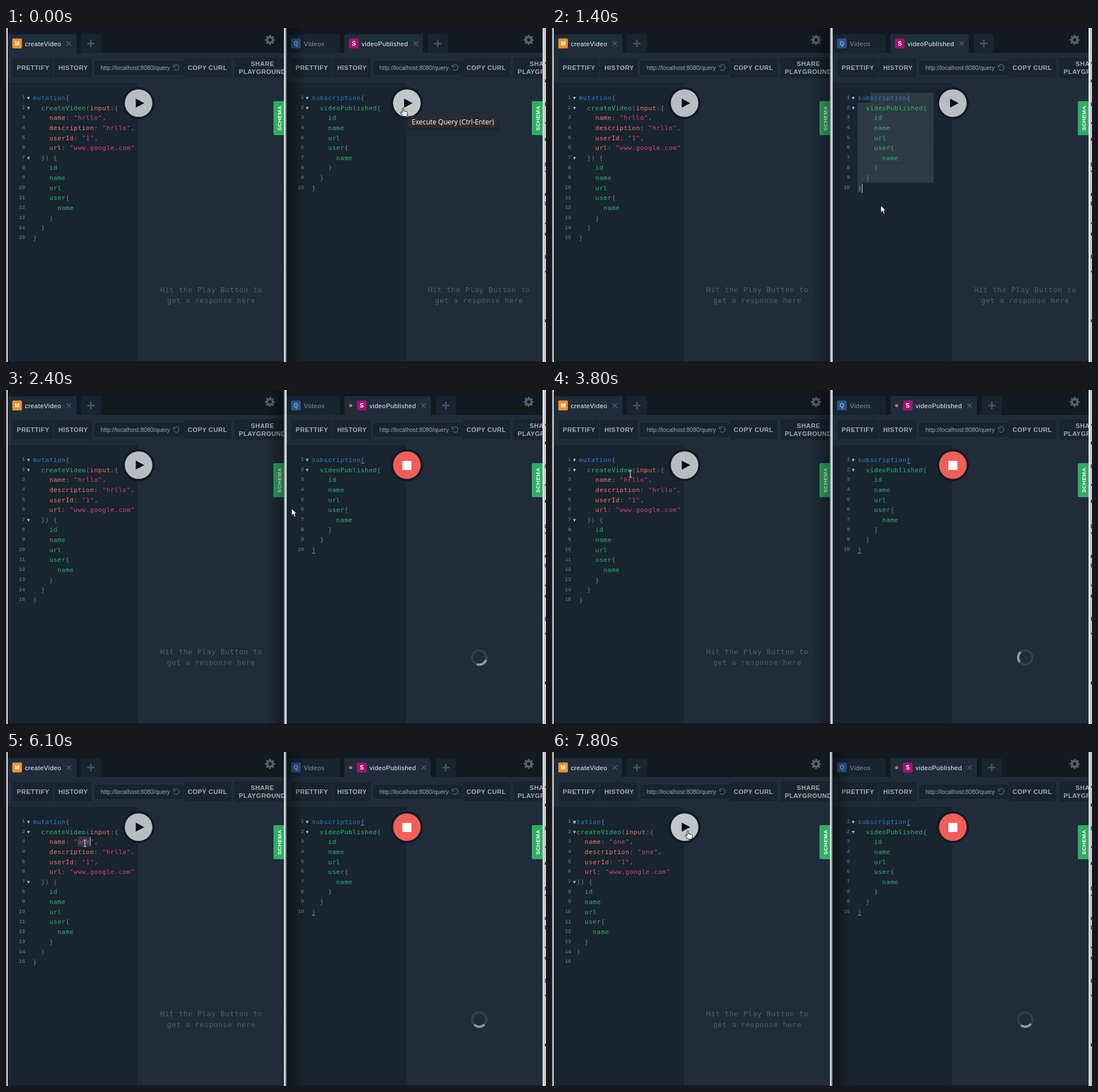
An HTML page that plays this animation: 951 by 589 pixels, repeating every 8 s.

```html
<!DOCTYPE html>
<html lang="en">
<head>
<meta charset="utf-8">
<title>Playground</title>
<style>
  html, body { margin: 0; width: 100%; height: 100%; overflow: hidden; background: #111a20; }
  svg { display: block; width: 951px; height: 589px; }
  text { white-space: pre; font: 11.2px "Liberation Sans", Arial, sans-serif; letter-spacing: .424px; }
  .code text { font: 11.2px "DejaVu Sans Mono", monospace; letter-spacing: .437px; fill: #77828a; }
  .k { fill: #2a7ed3; }
  .a { fill: #f77466; }
  .s { fill: #d64292; }
  .p { fill: #29b973; }
  text.num { font-size: 9.6px; font-weight: 700; letter-spacing: 0; fill: #5d6b75; text-anchor: end; }
  text.btn { font-weight: 700; fill: #a5abb1; }
  text.url { font-size: 10.4px; letter-spacing: 0; fill: #a0a7ad; }
  text.hint { font: 12.8px "DejaVu Sans Mono", monospace; letter-spacing: .48px; fill: #53606b; text-anchor: middle; }
  text.side { font-size: 9.6px; font-weight: 700; fill: #fff; text-anchor: middle; }
  text.badge { font-size: 10.4px; font-weight: 700; letter-spacing: 0; text-anchor: middle; }
  text.tip { font: 500 12px "Open Sans", "Noto Sans", sans-serif; letter-spacing: 0; fill: #fff; }
</style>
</head>
<body>
<svg id="stage" viewBox="0 0 951 589"></svg>
<script>
const LOOP = 8000, ROW = 17.64, CHAR = 7.18, CODE_X = 47.5, SHIFT = 491;
const BAR = '#121a20', PANEL = '#1f2d3b', EDITOR = '#18242e', CHIP = '#18242e';

const rect = (x, y, w, h, fill, more = '') =>
  `<rect x="${x}" y="${y}" width="${w}" height="${h}" fill="${fill}" ${more}/>`;
const circle = (x, y, r, fill, more = '') =>
  `<circle cx="${x}" cy="${y}" r="${r}" fill="${fill}" ${more}/>`;
const text = (x, y, str, cls = '', more = '') =>
  `<text x="${x}" y="${y}" class="${cls}" ${more}>${str}</text>`;
const path = (d, stroke, width, more = '') =>
  `<path d="${d}" fill="none" stroke="${stroke}" stroke-width="${width}" ${more}/>`;
const cross = x => path(`M${x - 4} 23.5l8 8m0-8l-8 8`, '#56636d', 1.3);
const plus = x => rect(x - 17.5, 11, 35, 33, CHIP, 'rx="2"') +
  path(`M${x - 6.5} 27.5h13m-6.5-6.5v13`, '#45525c', 3);
const badge = (x, letter, fill, ink) =>
  rect(x, 18.5, 17, 17.5, fill, 'rx="2"') + text(x + 8.5, 31, letter, 'badge', `fill="${ink}"`);
const gear = x => circle(x, 21, 4.9, 'none', 'stroke="#55626c" stroke-width="4"') +
  circle(x, 21, 7.5, 'none', 'stroke="#55626c" stroke-width="3" stroke-dasharray="2.95" stroke-dashoffset="1.47"');

const mutation = (name, desc) => [
  'mutation{', '  createVideo(input:{', `    name: "${name}",`, `    description: "${desc}",`,
  '    userId: "1",', '    url: "www.google.com"', '  }) {', '    id', '    name', '    url',
  '    user{', '      name', '    }', '  }', '}'];
const subscription = ['subscription{', '  videoPublished{', '    id', '    name', '    url',
  '    user{', '      name', '    }', '  }', '}'];

const paint = line => line.replace(/"[^"]*"|\w+(:?)/g, (word, colon) => {
  if (word[0] === '"') return `<tspan class="s">${word}</tspan>`;
  if (colon) return `<tspan class="a">${word.slice(0, -1)}</tspan>:`;
  return `<tspan class="${/^(mutation|subscription)$/.test(word) ? 'k' : 'p'}">${word}</tspan>`;
});
const code = lines => lines.map((l, i) => text(CODE_X, 127 + ROW * i, paint(l))).join('');
const gutter = (count, folds) =>
  Array.from({ length: count }, (_, i) => text(33.5, 125.2 + ROW * i, i + 1, 'num')).join('') +
  folds.map(i => `<path d="M37 ${121.6 + ROW * i}h5l-2.5 4.8z" fill="#b9bfc4"/>`).join('');

const toolbar = () => {
  const chip = (x, w, label, tx) => rect(x, 53, w, 34, CHIP, 'rx="2"') + text(tx, 74, label, 'btn');
  return chip(12, 71, 'PRETTIFY', 19) + chip(85, 66, 'HISTORY', 92.3) +
    rect(156.5, 59, 155, 22.5, CHIP, 'rx="3" stroke="#111b23"') +
    text(166.8, 74, 'http://localhost:8080/query', 'url') +
    path('M296 66.5a5 5 0 1 1-.3 6M295 65v3.8h3.8', '#6a757e', 1.1) +
    chip(313, 84, 'COPY CURL', 320) +
    rect(402, 52, 100, 36, CHIP, 'rx="2"') +
    text(431, 67, 'SHARE', 'btn') + text(410, 81, 'PLAYGROUND', 'btn');
};

function pane(id, x, end, split, gearX, dx, inner, tabs) {
  const hintX = (split + end) / 2 + (dx ? 8.5 : .5);
  return `<clipPath id="${id}Clip">${rect(x, 0, end - x, 589, '#000')}</clipPath>
  <g clip-path="url(#${id}Clip)">
    ${rect(x, 0, end - x, 44, BAR)}${rect(x, 44, end - x, 545, PANEL)}
    ${rect(x, 97, split - x, 492, EDITOR)}
    ${tabs}${gear(gearX)}
    <g transform="translate(${dx})">${toolbar()}${inner}</g>
    ${rect(end - 19, 129, 22, 60, '#30ad63', 'rx="2"')}
    ${text(0, 0, 'SCHEMA', 'side', `transform="translate(${end - 4.6} 159) rotate(-90)"`)}
    <g id="${id}Hint">${text(hintX, 466, 'Hit the Play Button to', 'hint')}${text(hintX, 485, 'get a response here', 'hint')}</g>
    ${rect(x, 588, end - x, 1, '#10181e')}
    ${rect(dx ? x : end - 32, 0, 32, 589, `url(#${id}Shade)`, `id="${id}Shadow"`)}
  </g>`;
}
const button = (id, x) => circle(x, 132.5, 28.3, '#111a21') +
  circle(x, 132.5, 24.3, '#b8bdc3', `id="${id}Disc"`) +
  `<path id="${id}Play" d="M${x - 5} 124.5v16l15-8z" fill="#0b0f13"/>`;
const shade = (id, from, to) => `<linearGradient id="${id}">
  <stop offset="0" stop-opacity="${from}"/><stop offset="1" stop-opacity="${to}"/></linearGradient>`;

const leftTabs = rect(3, 11, 121, 34, PANEL, 'rx="2"') + badge(11, 'M', '#f18f2b', '#fff') +
  text(33.2, 31.5, 'createVideo', '', 'fill="#f2f4f5"') + cross(110.5) + plus(149.5);
const rightTabs = rect(490, 11, 98, 33, CHIP, 'rx="2"') + badge(502, 'Q', '#265588', '#9aa9b8') +
  text(524.5, 31.5, 'Videos', '', 'fill="#8b959c"') +
  rect(596, 11, 138, 34, PANEL, 'id="tab" rx="2"') + circle(607, 27.5, 2.8, '#f25c54', 'id="dot"') +
  `<g id="tabBody">${badge(604, 'S', '#a6126f', '#fff')}${
    text(626.3, 31.5, 'videoPublished', '', 'fill="#f2f4f5"')}${cross(721.5)}${plus(760.5)}</g>`;

const bracket = (col, row) => rect(CODE_X + CHAR * col, 128.6 + ROW * row, 6.7, 1, '#8b959c');
const selRow = (from, to, row) =>
  rect(from, 114 + ROW * row, to - from, ROW + .1, '#2f3b44');
const allRows = selRow(CODE_X + CHAR * 3, 181, 0) +
  Array.from({ length: 8 }, (_, i) => selRow(47, 181, i + 1)).join('') + selRow(47, 55, 9);

// slivers of the page behind the right window
const behind = rect(945, 0, 6, 589, '#c7c9ce') +
  [60, 91, 131, 166, 194, 237, 251, 291, 306, 343, 361, 400, 428, 514].map((y, i) =>
    rect(949, y, 2, 3 + i % 3 * 2, ['#6b5560', '#3a3a52', '#54547c'][i % 3])).join('');

stage.innerHTML = `<defs>${shade('leftShade', 0, .38)}${shade('rightShade', .42, 0)}</defs>
  ${rect(0, 0, 951, 589, '#1a2127')}${rect(.8, 0, 2.2, 589, '#e8eaec')}${behind}
  ${pane('left', 3, 490, 232, 465, 0,
    `<clipPath id="codeClip">${rect(37, 98, 195, 490, '#000')}</clipPath>
     <g clip-path="url(#codeClip)"><g id="script" class="code"></g></g>${gutter(15, [0, 1, 6])}`, leftTabs)}
  ${pane('right', 494, 945, 704.5, 920.5, SHIFT,
    `<g id="all">${allRows}</g><g class="code">${code(subscription)}</g>
     <g id="pair">${bracket(12, 0)}${bracket(0, 9)}</g>
     ${rect(55, 275, 1, 16, '#c5cacd', 'id="caret"')}${gutter(10, [0, 1])}`, rightTabs)}
  ${button('left', 233.5)}${button('right', 706)}
  ${rect(698, 125, 16, 16, '#fff', 'id="stop"')}
  <g id="spinner">${circle(833.5, 471.8, 12.6, 'none', 'stroke="#33414c" stroke-width="4"')}
    ${path('M842.4 462.9a12.6 12.6 0 0 1 0 17.8', '#959b9f', 4, 'id="arc"')}</g>
  ${rect(490, 0, 4, 589, '#1a2127')}${rect(489.6, 0, 2.8, 589, '#e8eaec', 'id="edgeL"')}
  ${rect(492, 0, 2.2, 589, '#8d9398', 'id="edgeR"')}${rect(945, 0, 2, 589, '#e4e6e8', 'id="edgeEnd"')}
  <g id="tooltip">${rect(706, 155, 162, 26, '#000', 'opacity=".18" rx="4"')}
    ${rect(708, 155, 158, 21, '#2e2a2a', 'rx="3"')}${text(714.5, 169.6, 'Execute Query (Ctrl-Enter)', 'tip')}</g>
  <g id="pointer">
    <path id="arrow" d="M0 0v12.5l3-2.8 2.2 5 2.2-1-2.2-4.8h4z" fill="#fff" stroke="#111" stroke-width=".9"/>
    <path id="hand" d="M0 1.5Q0 0 1.2 0t1.2 1.5v4l5 .9q1.8.4 1.8 2.2l-.8 6H1L-2.8 9q-1.4-1.8.2-2.3L0 8.4z"
      fill="#fff" stroke="#111" stroke-width="1"/>
    <path id="beam" d="M-2.5-6Q0-6 0-4.5 0-6 2.5-6M0-4.5v9M-2.5 6Q0 6 0 4.5 0 6 2.5 6"
      fill="none" stroke="#e6e8ea" stroke-width="1.1"/>
  </g>`;

const $ = id => document.getElementById(id);
const show = (id, on) => $(id).setAttribute('display', on ? 'inline' : 'none');
const fill = (id, colour) => $(id).setAttribute('fill', colour);

// spans in tenths of a second in which the screen refreshes
const active = [[0, 9], [10, 20], [22, 24], [30, 33], [35, 36], [38, 40], [42, 44], [46, 51],
  [53, 56], [58, 59], [61, 64], [66, 67], [69, 71], [73, 73], [75, 78]];
const moves = [[0, 698, 141], [2, 694, 146], [5, 470, 178], [9, 165, 190], [12, 560, 123],
  [14, 579, 313], [16, 579, 313], [18, 618, 262], [20, 719, 128], [22, 716, 132], [24, 503, 209],
  [30, 420, 185], [33, 228, 140], [36, 219, 145], [38, 138, 148], [40, 138, 157], [44, 138, 160],
  [58, 138, 160], [61, 139, 161], [64, 139, 161], [66, 180, 176], [67, 186, 177], [71, 191, 178],
  [73, 196, 178], [75, 222, 150], [76, 238, 139], [80, 238, 139]];
const spins = [[22, -55], [24, 65], [38, 905], [46, 1350], [61, 2250], [78, 3322], [80, 3442]];
const kinds = [[0, 'hand'], [2, 'arrow'], [7, 'beam'], [10, 'arrow'], [12, 'beam'], [14, 'arrow'],
  [20, 'hand'], [23, 'arrow'], [32, 'hand'], [38, 'beam'], [75, 'hand']];
const names = [[0, 'hrllo'], [49, 'o'], [53, 'on'], [55, 'one']];
const marks = [[0, ''], [43, 'name'], [49, ''], [61, 'name'], [64, ''], [66, 'desc'], [69, '']];

const last = (table, k) => table.filter(row => row[0] <= k).pop();
const pick = (table, k) => last(table, k)[1];
function glide(table, k) {
  const i = Math.max(1, table.findIndex(row => row[0] > k));
  const a = table[i - 1], b = table[i];
  const f = Math.max(0, (k - a[0]) / (b[0] - a[0]));
  return a.slice(1).map((v, j) => v + (b[j + 1] - v) * f);
}

function script(k) {
  const name = pick(names, k), desc = k < 69 ? 'hrllo' : 'one', mark = pick(marks, k);
  const spot = (col, word, row) => {
    const x = CODE_X + CHAR * col, end = x + CHAR * word.length;
    return (mark ? selRow(x, end, row) : '') + rect(end, 114.5 + ROW * row, 1, 16, '#b9bfc3');
  };
  let under = '';
  if (k >= 43 && k < 66) under = spot(11, name, 2);
  else if (k >= 66 && k < 75) under = spot(18, desc, 3);
  $('script').innerHTML = under + code(mutation(name, desc));
  $('script').setAttribute('transform', `translate(${k < 69 ? 0 : -18.7})`);
}

function draw(k) {
  script(k);
  const rightFocus = k >= 10 && k < 42, live = k >= 22;
  show('leftShadow', rightFocus);
  show('rightShadow', !rightFocus);
  fill('edgeL', rightFocus ? '#a3a8ac' : '#e8eaec');
  fill('edgeR', rightFocus ? '#e8eaec' : '#70777c');
  fill('edgeEnd', rightFocus ? '#eef0f1' : '#d6d9db');

  show('all', k >= 14 && !live);
  show('caret', k >= 14 && k < 19);
  show('pair', live);
  show('dot', live);
  $('tab').setAttribute('width', live ? 152 : 138);
  $('tabBody').setAttribute('transform', `translate(${live ? 14 : 0})`);
  show('rightPlay', !live);
  show('stop', live);
  show('rightHint', !live);
  show('spinner', live);
  fill('rightDisc', live ? '#f25e57' : k < 2 ? '#c1c6cb' : '#b8bdc3');
  fill('leftDisc', (k >= 32 && k < 38) || k >= 75 ? '#c1c6cb' : '#b8bdc3');
  $('arc').setAttribute('transform', `rotate(${glide(spins, k)[0]} 833.5 471.8)`);

  show('tooltip', k < 1);
  const kind = pick(kinds, k);
  for (const id of ['arrow', 'hand', 'beam']) show(id, id === kind);
  $('pointer').setAttribute('transform', `translate(${glide(moves, k)})`);
}

let shown = -1;
const start = performance.now();
function tick(now) {
  const raw = Math.floor((Math.max(0, now - start) % LOOP) / 100);
  const k = Math.min(raw, last(active, raw)[1]);
  if (k !== shown) draw(shown = k);
  requestAnimationFrame(tick);
}
tick(start);
</script>
</body>
</html>
```
